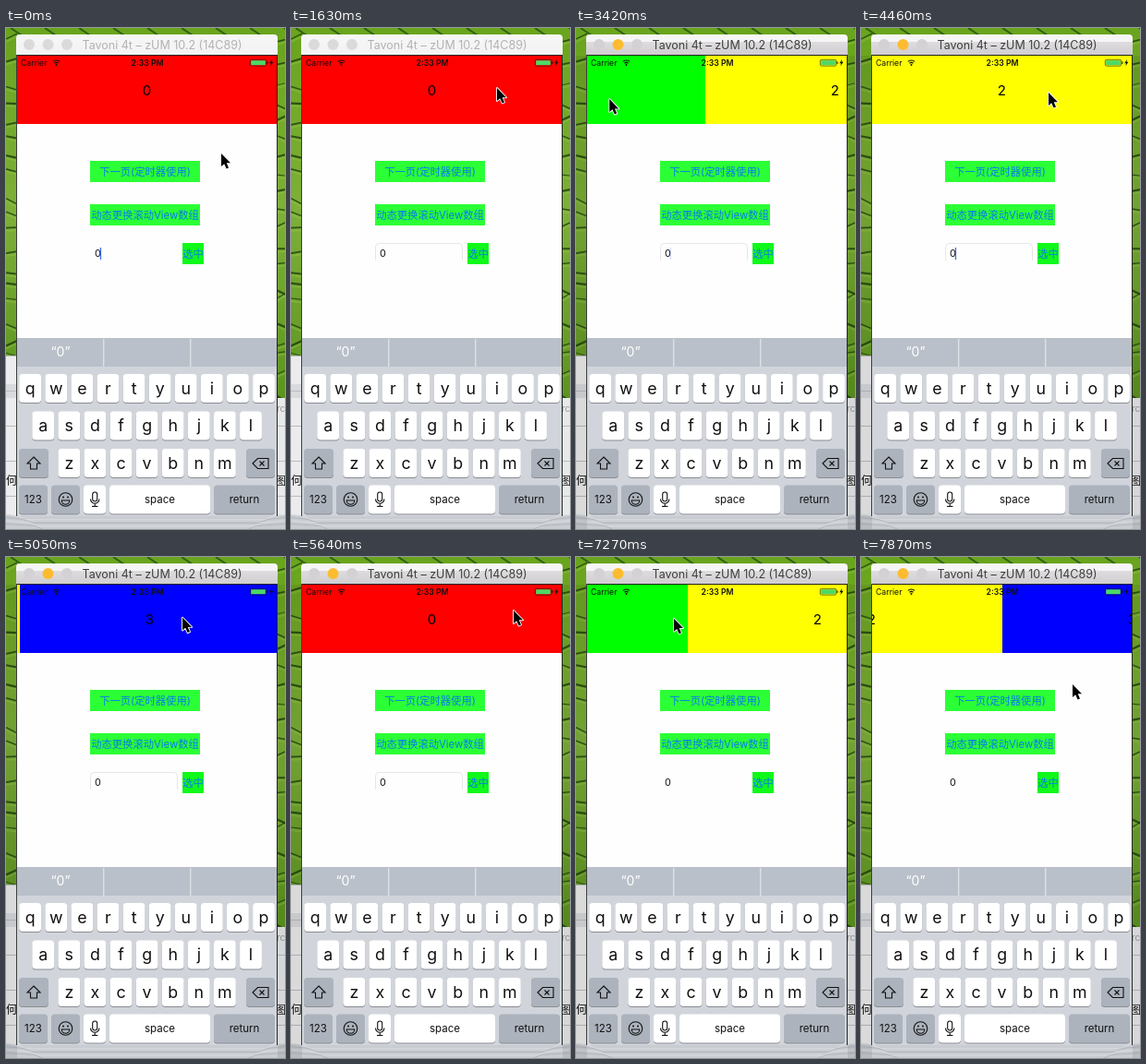
An HTML page with a canvas that plays this animation: 302 by 543 pixels, repeating every 8000 ms.

```html
<!DOCTYPE html>
<html lang="zh">
<head>
<meta charset="utf-8">
<title>Carousel demo</title>
<style>
html, body { margin: 0; width: 100%; height: 100%; overflow: hidden; background: #fff; }
canvas { display: block; width: 302px; height: 543px; }
</style>
</head>
<body>
<canvas id="stage"></canvas>
<script>
const W = 302, H = 543, LOOP = 8000, STEP = 148.64;
const LATIN = 'Inter, Roboto, sans-serif';
const HAN = 'Inter, "Noto Sans CJK SC", "Noto Sans CJK", sans-serif';
const INK = '#111';
const PAGES = ['#f00', '#0f0', '#ff0', '#00f'];
const VIEW = { x: 12, y: 29, w: 281.5, h: 75 };

// Each swipe moves the carousel on by one page: start and duration.
const SWIPES = [[1780, 900], [3039, 700], [4480, 600], [5140, 500], [5701, 1103], [6930, 600]];
const AUTO = [7570, 600];
// Where the pointer rests between swipes: time, x, y.
const REST = [[0, 233, 136], [1030, 229, 138], [1627, 223, 65], [4451, 203, 70],
  [5640, 241, 58], [6681, 263, 68], [7870, 289, 48]];

const canvas = document.getElementById('stage');
const ratio = window.devicePixelRatio || 1;
canvas.width = W * ratio;
canvas.height = H * ratio;
const stageCtx = canvas.getContext('2d');
let c = stageCtx;

const clamp = v => Math.min(1, Math.max(0, v));
const smooth = u => u * u * (3 - 2 * u);
const progress = (t, [start, length]) => clamp((t - start) / length);

function scrollAt(t) {
  return [...SWIPES, AUTO].reduce((sum, s) => sum + smooth(progress(t, s)), 0);
}

function pointerAt(t) {
  const i = Math.max(1, REST.findIndex(k => k[0] >= t));
  const [t0, x0, y0] = REST[i - 1], [t1, x1, y1] = REST[i];
  const u = clamp((t - t0) / (t1 - t0));
  const pull = SWIPES.reduce((sum, s) => sum + Math.sin(Math.PI * progress(t, s)), 0);
  return [x0 + (x1 - x0) * u - 175 * pull, y0 + (y1 - y0) * u + 9 * pull];
}

function caretAlpha(t) {
  const phase = t / 1110 % 1;
  return phase < .6 ? clamp((.085 - phase) / .055) : clamp((phase - .6) / .1);
}

function stepTime(t) {
  if (t < 300) return 0;
  if (t < 1318) return Math.min(1030, 300 + 146 * Math.floor((t - 300) / 146));
  return 1330 + STEP * Math.min(44, Math.floor((t - 1318) / STEP));
}

function rect(x, y, w, h, fill) {
  c.fillStyle = fill;
  c.fillRect(x, y, w, h);
}

function roundRect(x, y, w, h, r, fill) {
  c.beginPath();
  c.roundRect(x, y, w, h, r);
  c.fillStyle = fill;
  c.fill();
}

function text(s, x, y, size, fill, font = LATIN, weight = 400, align = 'center') {
  c.font = `${weight} ${size}px ${font}`;
  c.textAlign = align;
  c.fillStyle = fill;
  c.fillText(s, x, y);
}

function path(points, closed) {
  c.beginPath();
  points.forEach(p => c.lineTo(...p));
  if (closed) c.closePath();
}

function line(points, color, width = 1, closed = false) {
  path(points, closed);
  c.strokeStyle = color;
  c.lineWidth = width;
  c.stroke();
}

function arc(x, y, r, from = 0, to = 7) {
  c.beginPath();
  c.arc(x, y, r, from, to);
  c.stroke();
}

function disc(x, y, r, fill) {
  c.beginPath();
  c.arc(x, y, r, 0, 7);
  c.fillStyle = fill;
  c.fill();
}

function grass() {
  const g = c.createLinearGradient(0, 0, 0, 400);
  g.addColorStop(0, '#69a41d');
  g.addColorStop(.5, '#7db038');
  g.addColorStop(1, '#5c941f');
  rect(0, 0, W, 401, g);
  let seed = 7;
  const rnd = () => (seed = seed * 16807 % 2147483647) / 2147483647;
  for (let y = 12; y < 400; y += 20) {
    for (const x of [0, 293]) {
      const top = y + rnd() * 14, slant = 7 - rnd() * 14;
      line([[x, top], [x + 12, top + slant]], 'rgba(24,52,8,.75)', .8 + rnd() * 1.6);
      line([[x, top + 3], [x + 12, top + 3 + slant]], 'rgba(150,200,75,.4)', 2);
    }
  }
  for (let x = 5; x < W; x += 37) line([[x, 0], [x + 12, 8]], '#315f12', 2);
}

function desktop() {
  grass();
  rect(0, 355, 14, 188, '#ececee');
  rect(291, 401, 11, 142, '#e8e9eb');
  rect(0, 386, 14, 15, '#d9dadd');
  for (let y = 355; y < 520; y += 38) {
    rect(0, y, 14, 1, '#b9bbc0');
    if (y > 400) rect(291, y, 11, 1, '#b9bbc0');
  }
  text('rc', 293, 416, 10, '#999', LATIN, 400, 'left');
  text('如何', 12, 495, 12, INK, HAN, 400, 'right');
  text('图', 292, 495, 11, INK, HAN, 400, 'left');
  rect(0, 528, W, 15, '#c9ccd1');
  for (let i = 0; i < 4; i++) {
    const y = 529 + i * 3.5, x = 13 + i * 6;
    line([[0, y - 2], [x, y], [x + 9, y + 4], [293 - x, y + 4], [302 - x, y], [302, y - 2]],
      i % 2 ? '#b2b6bd' : '#dcdee2');
  }
}

function key(x, y, w, gray) {
  roundRect(x, y + 1, w, 31, 3.8, '#898c91');
  roundRect(x, y, w, 31, 3.8, gray ? '#acb3bd' : '#fff');
}

function keyIcons() {
  line([[30, 465], [37, 472], [33.5, 472], [33.5, 478], [26.5, 478], [26.5, 472], [23, 472]],
    INK, 1.1, true);
  line([[267, 472], [272.5, 466.5], [284, 466.5], [284, 477.5], [272.5, 477.5]], INK, 1.1, true);
  line([[274.5, 469.5], [279.5, 474.5]], INK, 1.1);
  line([[279.5, 469.5], [274.5, 474.5]], INK, 1.1);

  arc(64.5, 511, 7.3);
  c.beginPath();
  c.arc(64.5, 512, 4.3, 0, Math.PI);
  c.closePath();
  c.stroke();
  disc(62, 508.5, 1, INK);
  disc(67, 508.5, 1, INK);

  c.beginPath();
  c.roundRect(93.7, 503, 5, 10, 2.5);
  c.stroke();
  arc(96.2, 510.5, 4.7, 0, Math.PI);
  line([[96.2, 515.5], [96.2, 518.5]], INK, 1.1);
  line([[93, 518.5], [99.4, 518.5]], INK, 1.1);
}

function keyboard() {
  rect(12, 367, 282, 162, '#d1d5db');
  rect(12, 336, 282, 31, '#bac0c9');
  for (const x of [105, 199]) rect(x, 337, 1.4, 30, '#dde1e6');
  text('“0”', 59, 356, 14, '#fff');
  ['qwertyuiop', 'asdfghjkl', 'zxcvbnm'].forEach((letters, row) => {
    const y = 375 + row * 40.5;
    [...letters].forEach((ch, i) => {
      const x = 152.6 + (i - (letters.length - 1) / 2) * 28.1;
      key(x - 11.9, y, 23.8);
      text(ch, x, y + 21.5, 17.8, INK);
    });
  });
  key(14, 456, 32, true);
  key(260, 456, 31, true);
  key(14, 495.5, 31, true);
  key(49, 495.5, 31, true);
  key(84, 495.5, 24);
  key(112, 495.5, 109);
  key(225, 495.5, 66, true);
  text('123', 29.5, 515.3, 11.5, INK);
  text('space', 166.5, 515, 11.5, INK);
  text('return', 258, 515, 11.5, INK);
  keyIcons();
}

function button(label, x, y, w, fill = '#2bff35') {
  rect(x, y, w, 23, fill);
  text(label, x + w / 2, y + 15.7, 11.3, '#087bea', HAN);
}

function content() {
  rect(12, 104, 282, 232, '#fefefe');
  button('下一页(定时器使用)', 91, 144, 119);
  button('动态更换滚动View数组', 91, 191, 119);
  button('选中', 191, 233, 23, '#10f91a');
}

function makeBackdrop() {
  const layer = document.createElement('canvas');
  layer.width = canvas.width;
  layer.height = canvas.height;
  c = layer.getContext('2d');
  c.scale(ratio, ratio);
  desktop();
  content();
  keyboard();
  c = stageCtx;
  return layer;
}

function titleBar(active) {
  const g = c.createLinearGradient(0, 7, 0, 29);
  g.addColorStop(0, '#f7f7f7');
  g.addColorStop(.36, '#f5f5f5');
  g.addColorStop(.36, active ? '#dedcde' : '#f5f5f5');
  g.addColorStop(1, active ? '#d0ced0' : '#f3f3f3');
  roundRect(11, 7, 283, 23, [4, 4, 0, 0], g);
  const dim = active ? '#d3d1d3' : '#dadada';
  [dim, active ? '#fdbc2f' : dim, dim].forEach((fill, i) => disc(25 + i * 20.5, 18, 6, fill));
  text('Tavoni 4t – zUM 10.2 (14C89)', 169, 22.7, 12.5, active ? '#3f3f3f' : '#b2b2b2');
}

function carousel(pos) {
  c.save();
  c.beginPath();
  c.rect(VIEW.x, VIEW.y, VIEW.w, VIEW.h);
  c.clip();
  const first = Math.floor(pos);
  for (let i = first; i < first + 2; i++) {
    const x = Math.round(VIEW.x + (i - pos) * VIEW.w);
    rect(x, VIEW.y, VIEW.w + 1, VIEW.h, PAGES[i % 4]);
    text(i % 4, x + 140.4, 73, 15, '#000');
  }
  c.restore();
}

function statusBar() {
  text('Carrier', 16, 41, 8.7, INK, LATIN, 400, 'left');
  text('2:33 PM', 153, 41, 8.7, INK, LATIN, 600);
  c.strokeStyle = INK;
  c.lineWidth = 1.2;
  for (const r of [3, 5.5]) arc(54.5, 40.5, r, -2.3, -.84);
  disc(54.5, 40, 1, INK);
  c.lineWidth = .6;
  c.beginPath();
  c.roundRect(264.3, 34.3, 17.4, 6.8, 1.5);
  c.stroke();
  rect(265.2, 35.2, 15.6, 5, '#4cd964');
  rect(282.4, 36.4, 1, 2.5, INK);
  path([[288, 34], [285.2, 38.2], [287, 38.2], [286.4, 41.2], [289.4, 36.8], [287.5, 36.8]]);
  c.fillStyle = INK;
  c.fill();
}

function field(t) {
  if (t > 1400 && t < 7000) {
    c.save();
    c.beginPath();
    c.rect(90, 232, 98, 20);
    c.clip();
    c.beginPath();
    c.roundRect(91.5, 233.5, 94, 30, 4);
    c.strokeStyle = '#e6e6e6';
    c.lineWidth = 1;
    c.stroke();
    c.restore();
  }
  text('0', 99.3, 248.3, 10.8, INK);
  c.globalAlpha = caretAlpha(t);
  rect(101.8, 238, 1.3, 13, '#3d6bf0');
  c.globalAlpha = 1;
}

function pointer([x, y]) {
  c.save();
  c.translate(x, y);
  path([[0, 0], [0, 14], [3.2, 11.2], [5.6, 16.5], [8, 15.5], [5.7, 10.3], [10, 10.3]], true);
  c.lineJoin = 'round';
  c.strokeStyle = '#fff';
  c.lineWidth = 1.8;
  c.stroke();
  c.fillStyle = '#000';
  c.fill();
  c.restore();
}

const backdrop = makeBackdrop();

function draw(now) {
  const t = stepTime(now % LOOP);
  const active = t > 1760;
  c.setTransform(1, 0, 0, 1, 0, 0);
  c.drawImage(backdrop, 0, 0);
  c.scale(ratio, ratio);
  if (active) {
    rect(0, 30, 12, 513, 'rgba(0,0,0,.08)');
    rect(294, 30, 8, 513, 'rgba(0,0,0,.08)');
  }
  titleBar(active);
  carousel(scrollAt(t));
  statusBar();
  field(t);
  rect(11, 29, 283, 1, '#242424');
  rect(11, 29, 1, 500, '#3b3f3b');
  rect(293, 29, 1, 500, '#252725');
  pointer(pointerAt(t));
}

const start = performance.now();
function tick() {
  draw(performance.now() - start);
  requestAnimationFrame(tick);
}
tick();
</script>
</body>
</html>
```
